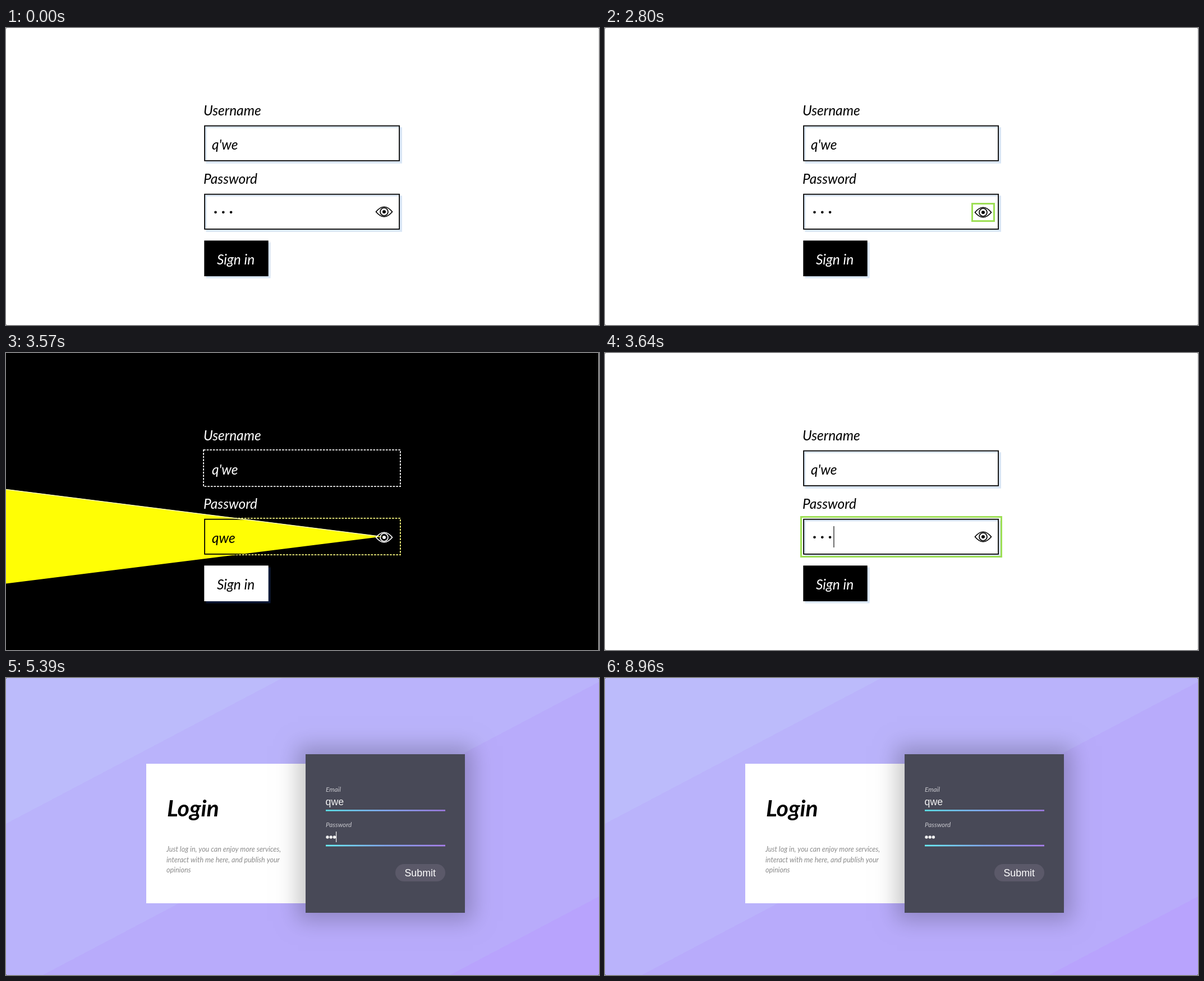
Recreate the animation shown at these times as an HTML page with a canvas. Size 1057 by 530 pixels, loop 9.38 s.

```html
<!DOCTYPE html>
<html lang="en">
<head>
<meta charset="utf-8">
<title>Sign-in forms</title>
<style>
html, body { margin: 0; width: 100%; height: 100%; overflow: hidden; background: #fff; }
canvas { display: block; width: 1057px; height: 530px; }
</style>
</head>
<body>
<canvas id="stage" width="1057" height="530"></canvas>
<script>
const ctx = document.getElementById('stage').getContext('2d');
const W = 1057, H = 530, LOOP = 9380;
const SCRIPT = 'Lato, "Open Sans", sans-serif';
const ARIAL = '"Liberation Sans", Arial, sans-serif';
const FORM_FONT = `italic 24.5px ${SCRIPT}`;
const TINT = '#d9e6f5', GREEN = '#9ddf55';
const BORDER = 1.8;

// Each row: start time, scene, focused part, caret shown.
const TIMELINE = [
  [0, 'light', '', false],
  [1050, 'light', 'password', true],
  [1540, 'light', 'username', true],
  [2030, 'light', 'username', false],
  [2240, 'light', 'password', true],
  [2730, 'light', 'eye', false],
  [2800, 'light', 'pressed', false],
  [2940, 'dark', 'password', true],
  [3430, 'dark', 'password', false],
  [3570, 'dark', 'pressed', false],
  [3640, 'light', 'password', true],
  [4200, 'light', 'password', false],
  [4690, 'light', 'password', true],
  [5250, 'light', 'password', false],
  [5390, 'card', 'password', true],
  [5880, 'card', 'password', false],
  [6370, 'card', 'password', true],
  [6510, 'card', 'email', true],
  [6930, 'card', 'password', true],
  [7420, 'card', 'email', true],
  [7980, 'card', 'password', true],
  [8470, 'card', 'submit', false]
];

function rect(x, y, w, h, color) {
  ctx.fillStyle = color;
  ctx.fillRect(x, y, w, h);
}

function frame(x, y, w, h, color, line, dash = []) {
  ctx.strokeStyle = color;
  ctx.lineWidth = line;
  ctx.setLineDash(dash);
  ctx.strokeRect(x + line / 2, y + line / 2, w - line, h - line);
  ctx.setLineDash([]);
}

function text(str, x, y, color, font) {
  ctx.font = font;
  ctx.fillStyle = color;
  ctx.fillText(str, x, y);
}

function dot(x, y, r, color) {
  ctx.fillStyle = color;
  ctx.beginPath();
  ctx.arc(x, y, r, 0, Math.PI * 2);
  ctx.fill();
}

function dots(x, y, gap, r, color) {
  for (let i = 0; i < 3; i++) dot(x + i * gap, y, r, color);
}

function corners(color) {
  for (const x of [0, W - 1]) for (const y of [0, H - 1]) rect(x, y, 1, 1, color);
}

function eye(y, ink) {
  ctx.strokeStyle = ink;
  ctx.lineWidth = 1.7;
  ctx.beginPath();
  ctx.moveTo(659.5, y);
  ctx.quadraticCurveTo(674, y - 17.5, 688.5, y);
  ctx.quadraticCurveTo(674, y + 17.5, 659.5, y);
  ctx.closePath();
  ctx.stroke();
  ctx.beginPath();
  ctx.arc(674, y, 7, 0, Math.PI * 2);
  ctx.stroke();
  dot(674, y, 3, ink);
}

function inset(y, color) {
  rect(355, y + 2, 345, 2.7, color);
  rect(355, y + 2, 2.7, 60, color);
}

function field(y) {
  rect(356.5, y + 3.5, 349.5, 64.5, TINT);
  rect(353, y, 349, 64, '#fff');
  inset(y, TINT);
  frame(353.2, y, 348.8, 64, '#000', BORDER);
}

function button(bg, ink, shadow) {
  rect(356.5, 382.5, 115, 64, shadow);
  rect(353.3, 379.3, 114.4, 63.7, bg);
  text('Sign in', 376, 422, ink, FORM_FONT);
}

function labels(ink) {
  text('Username', 352, 156, ink, FORM_FONT);
  text('Password', 352, 278, ink, FORM_FONT);
  text("q'we", 367, 217, ink, FORM_FONT);
}

function drawLight(focus, caret) {
  rect(0, 0, W, H, '#fff');
  field(173.7);
  field(295.8);
  labels('#000');
  dots(373.5, 328.7, 13.8, 2.3, '#000');
  button('#000', '#fff', TINT);
  eye(focus === 'pressed' ? 329 : 328, '#000');
  if (focus === 'username') frame(348, 169, 360, 74, GREEN, 3);
  if (focus === 'password') frame(348, 291, 360, 74, GREEN, 3);
  if (focus === 'eye' || focus === 'pressed') frame(653, 312, 42, 34, GREEN, 3);
  if (caret && focus === 'username') rect(415, 187, 1.3, 37, '#222');
  if (caret && focus === 'password') rect(407.3, 309, 1.3, 38, '#222');
  rect(W - 1, 0, 1, H, '#dedede');
  corners('#777');
}

function drawDark(focus, caret) {
  rect(0, 0, W, H, '#000');
  frame(351.2, 172, 352.6, 67, '#fff', BORDER, [3.6, 2]);
  frame(351.2, 294, 352.6, 67, '#ffff80', BORDER, [3.6, 2]);
  labels('#fff');
  button('#fff', '#000', '#0b1836');

  ctx.save();
  ctx.beginPath();
  ctx.moveTo(671, 327.5);
  ctx.lineTo(0, 243);
  ctx.lineTo(0, 411.5);
  ctx.closePath();
  ctx.fillStyle = '#fffe05';
  ctx.fill();
  ctx.clip();
  frame(353.2, 295.8, 348.8, 64, '#000', BORDER);
  text('qwe', 367, 339, '#000', FORM_FONT);
  if (caret) rect(409, 309, 1.3, 38, '#222');
  ctx.restore();

  // Pale rim along the beam's upper edge.
  ctx.strokeStyle = '#ffffb4';
  ctx.lineWidth = 1.5;
  ctx.beginPath();
  ctx.moveTo(0, 243.5);
  ctx.lineTo(664, 327);
  ctx.stroke();

  eye(focus === 'pressed' ? 329 : 328, '#fff');
  rect(W - 1, 0, 1, H, '#dedede');
}

function backdrop() {
  const g = ctx.createLinearGradient(0, 0, 449, 851);
  const bands = ['#bcbbfb', '#bab3fb', '#b8abfb', '#b8a3fd'];
  const edges = [0, 0.239, 0.519, 0.871, 1];
  bands.forEach((c, i) => {
    g.addColorStop(edges[i], c);
    g.addColorStop(edges[i + 1], c);
  });
  rect(0, 0, W, H, g);
}

function underline(y, from, to) {
  const g = ctx.createLinearGradient(570, 0, 783, 0);
  g.addColorStop(0, from);
  g.addColorStop(0.5, '#84a9f2');
  g.addColorStop(1, to);
  rect(570, y, 213, 2.7, g);
}

function cardShadow() {
  ctx.save();
  ctx.shadowColor = 'rgba(0,0,0,.22)';
  ctx.shadowBlur = 36;
  ctx.shadowOffsetX = 2000;
  rect(520 - 2000, 122, 312, 311, '#000');
  ctx.restore();
}

function drawCard(focus, caret, t) {
  backdrop();
  rect(250, 153, 284, 249, '#fff');
  text('Login', 287, 247, '#000', `italic 700 41px ${SCRIPT}`);
  const note = `italic 12.5px ${SCRIPT}`;
  ['Just log in, you can enjoy more services,',
   'interact with me here, and publish your',
   'opinions'].forEach((s, i) => text(s, 286, 310 + i * 18.5, '#8b8b8b', note));

  cardShadow();
  rect(534, 136, 284, 283, '#484957');
  const label = `italic 11.8px ${SCRIPT}`;
  text('Email', 570, 203, '#c6c6cc', label);
  text('Password', 570, 266, '#c6c6cc', label);
  text('qwe', 569.5, 227, '#f2f2f2', `17.8px ${ARIAL}`);
  dots(573, 284, 6.2, 2.7, '#f2f2f2');
  underline(235, '#5bdfe6', '#9a78dc');
  underline(297.7, '#6bf5fb', '#ab80f0');
  if (caret && focus === 'email') rect(602.5, 211, 1.2, 19, '#f2f2f2');
  if (caret && focus === 'password') rect(588, 274, 1.2, 19, '#f2f2f2');

  // The pill brightens and settles again while it is pressed.
  const p = Math.min(Math.max((t - 8330) / 630, 0), 1);
  const lift = 20 * Math.sin(Math.PI * p);
  ctx.fillStyle = `rgb(${91 + lift}, ${89 + lift}, ${105 + lift})`;
  ctx.beginPath();
  ctx.roundRect(694, 332, 89, 31, 15.5);
  ctx.fill();
  text('Submit', 710.5, 354, '#fff', `17.8px ${ARIAL}`);
  corners('#55556a');
}

function render(now) {
  const t = now % LOOP;
  const [, scene, focus, caret] = TIMELINE.findLast(row => row[0] <= t);
  if (scene === 'light') drawLight(focus, caret);
  else if (scene === 'dark') drawDark(focus, caret);
  else drawCard(focus, caret, t);
}

const start = performance.now();
function tick() {
  render(Math.max(performance.now() - start, 0));
  requestAnimationFrame(tick);
}
tick();
</script>
</body>
</html>
```
